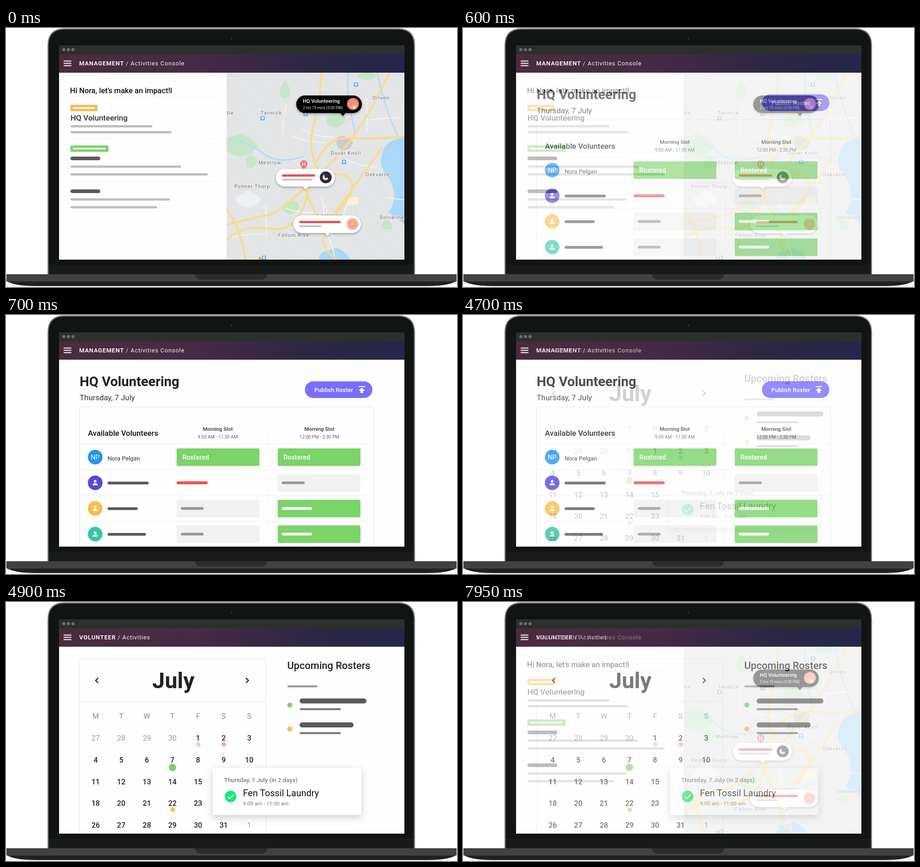
These frames come from a looping animation (986x568 px, 8 s). An HTML page:

```html
<!DOCTYPE html>
<html lang="en">
<head>
<meta charset="utf-8">
<title>Volunteer roster</title>
<style>
  html, body { margin: 0; height: 100%; overflow: hidden; background: #fff; }
  svg { display: block; width: 986px; height: 568px; font-family: Roboto, Arial, sans-serif; }
  .road { fill: none; stroke-linecap: round; stroke-linejoin: round; }
  .place { letter-spacing: 1px; paint-order: stroke; stroke: #f4f4f4; stroke-width: 2px; }
  .head { letter-spacing: .8px; }
</style>
</head>
<body>
<svg viewBox="0 0 986 568">
  <defs>
    <linearGradient id="header" gradientUnits="userSpaceOnUse" x1="116" y1="58" x2="871" y2="98">
      <stop offset="0" stop-color="#4a2c3d"/><stop offset=".4" stop-color="#452b43"/>
      <stop offset=".75" stop-color="#2b2743"/><stop offset="1" stop-color="#25264a"/>
    </linearGradient>
    <radialGradient id="sun">
      <stop offset="0" stop-color="#ffe0b0"/><stop offset=".35" stop-color="#ff9f87"/>
      <stop offset=".6" stop-color="#ff9a92"/><stop offset=".65" stop-color="#ffaaa5"/>
      <stop offset="1" stop-color="#ffb0aa"/>
    </radialGradient>
    <pattern id="streets" width="17" height="13" patternUnits="userSpaceOnUse" patternTransform="rotate(14)">
      <path d="M0 0H17M0 0V13" stroke="#f3f4f5" stroke-width="1.4"/>
    </pattern>
    <filter id="soft" x="-20%" y="-40%" width="140%" height="200%">
      <feDropShadow dx="0" dy="2" stdDeviation="2.5" flood-opacity=".35"/>
    </filter>
    <filter id="lift" x="-20%" y="-30%" width="140%" height="180%">
      <feDropShadow dx="0" dy="5" stdDeviation="8" flood-opacity=".2"/>
    </filter>
    <clipPath id="screen"><path d="M116 58H871V508H116Z"/></clipPath>
    <clipPath id="mapArea"><path d="M482.5 98H871V508H482.5Z"/></clipPath>
  </defs>
  <path d="M92 541V38Q92 2 128 2H857Q893 2 893 38V541Z" fill="#121313" stroke="#777a7b" stroke-width="2.5"/>
  <path d="M94 519H891V540H94Z" fill="#191a1a"/>
  <circle cx="493" cy="23" r="2.5" fill="#292b2b"/>
  <path d="M116 38H871V58H116Z" fill="#2d2e2e"/>
  <path d="M126.500 47.500h20.500" stroke="#6a6b6b" stroke-width="7" stroke-linecap="round" stroke-dasharray="0 10"/>
  <path d="M1 555H985Q966 566 922 566H64Q20 566 1 555Z" fill="#202121"/>
  <path d="M1 540H985V556H1Z" fill="#404141"/>
  <path d="M413 540H571Q570 552 556 552H428Q414 552 413 540Z" fill="#2b2c2c"/>
  <g id="pages" clip-path="url(#screen)"></g>
</svg>
<script>
const GREEN = '#7bd468', ORANGE = '#fbbc4b', RED = '#e95350', DARK = '#5a5a5a', GREY = '#bdbdbd';

const rect = (x, y, w, h, fill, r = 0, extra = '') =>
  `<rect x="${x}" y="${y}" width="${w}" height="${h}" rx="${r}" fill="${fill}" ${extra}/>`;
const bar = (x, y, w, h, fill) => rect(x, y - h / 2, w, h, fill, h / 2);
const dot = (x, y, r, fill) => `<circle cx="${x}" cy="${y}" r="${r}" fill="${fill}"/>`;
const path = (d, fill, extra = '') => `<path d="${d}" fill="${fill}" ${extra}/>`;
const stroke = (d, color, w) => path(d, 'none', `stroke="${color}" stroke-width="${w}"`);
const rule = (x1, x2, y) => stroke(`M${x1} ${y}H${x2}`, '#eee', 1);
const text = (x, y, size, str, fill = '#222', weight = 400, extra = '') =>
  `<text x="${x}" y="${y}" font-size="${size}" fill="${fill}" font-weight="${weight}" ${extra}>${str}</text>`;
const mid = 'text-anchor="middle"';
const repeat = (n, draw) => Array.from({ length: n }, (_, i) => draw(i)).join('');

let seed = 7;
const random = () => (seed = seed * 16807 % 2147483647) / 2147483647;

function page(title, section, body) {
  return '<g>' + rect(116, 98, 755, 410, '#fefefe') + rect(116, 58, 755, 40, 'url(#header)') +
    repeat(3, i => rect(126, 71.5 + 5 * i, 17, 2, '#fff')) +
    text(160, 82, 13, `<tspan font-weight="700">${title}</tspan> / ${section}`, '#f4f1f4', 400, 'class="head"') +
    body + '</g>';
}

function bubble(x, y, w, tail, fill) {
  return '<g filter="url(#soft)">' + rect(x, y, w, 38.5, fill, 19.25) +
    path(`M${tail - 6} ${y + 38}h12l-6 7Z`, fill) + '</g>';
}

// Irregular polygon around a centre
function blob(x, y, rx, ry, fill) {
  const points = Array.from({ length: 8 }, (_, i) => {
    const a = i * Math.PI / 4, r = .75 + .4 * random();
    return `${x + rx * r * Math.cos(a)} ${y + ry * r * Math.sin(a)}`;
  });
  return path(`M${points.join('L')}Z`, fill);
}

const roads = (d, color, w) => path(d, 'none', `class="road" stroke="${color}" stroke-width="${w}"`);

function cityMap() {
  const highways = 'M690 98Q688 150 672 215T692 322M838 98Q795 190 757 241T655 350 575 410 482 432' +
    'M871 238Q810 245 757 241T680 292M820 265Q775 330 708 420M482 466Q515 430 575 440T655 378 742 324' +
    'M742 324Q780 345 722 407T724 508M482 398Q512 435 524 508M654 350Q665 390 700 450';
  let minor = '';
  for (let i = 0; i < 14; i++) {
    const x = 490 + 370 * random(), y = 110 + 380 * random(), tilt = 40 * random() - 20;
    minor += i % 2 ? `M${x} ${y}q${tilt} 30 ${tilt} 70` : `M${x} ${y}q30 ${tilt} 70 ${tilt}`;
  }
  const place = (x, y, name) => text(x, y, 11, name, '#6c6d70', 400, 'class="place"');
  const station = (x, y) => rect(x - 4.5, y - 4.5, 9, 9, '#4ea4ec', 1.5) +
    rect(x - 2.5, y - 3, 5, 4.5, '#e8f5ff', 1) + rect(x - 2, y + 2.5, 4, 1, '#e8f5ff');
  const park = (x, y, rx, ry) => blob(x, y, rx, ry, '#c5e7c5');
  return '<g clip-path="url(#mapArea)">' + rect(482, 98, 389, 410, '#e3e4e5') +
    rect(482, 98, 389, 410, 'url(#streets)', 0, 'opacity=".3"') +
    park(610, 137, 14, 20) + park(722, 200, 24, 18) + park(790, 105, 22, 10) + park(512, 258, 36, 24) +
    park(622, 394, 20, 16) + park(832, 432, 14, 12) + park(536, 295, 14, 14) +
    blob(737, 250, 20, 18, '#cbcccf') + blob(530, 376, 28, 18, '#eef0f4') + blob(758, 380, 15, 10, '#fbf0d4') +
    path('M871 241Q838 242 826 266T826 314Q845 334 848 360T836 404L871 430Z', '#a9d8fa') +
    path('M684 508Q686 488 704 490 728 470 753 508Z', '#a9d8fa') +
    roads('M482 242Q530 250 562 275T650 282M748 98Q742 140 764 232M812 98Q824 165 858 242', '#b1dcfa', 3) +
    roads(minor, '#f6f4ec', 2) + roads(highways, '#f2d273', 3.8) + roads(highways, '#fddf8a', 2.6) +
    place(801, 157, 'Orlven') + place(557, 190, 'Tarmick') + place(473, 190, 'odle') +
    place(710, 278, 'Duvar Knoll') + place(552, 299, 'Mestrow') + place(786, 325, 'Oakvarne') +
    place(499, 351, 'Polmer Thorp') + place(681, 415, 'Lanterise') + place(817, 419, 'Solvarine') +
    place(595, 458, 'Fallom Rise') +
    station(765, 124) + station(561, 198) + station(655, 189) + station(739, 294) + station(564, 504) +
    dot(555, 505, 3.5, '#f4b344') +
    path('M643 298a8 8 0 0 1 16 0q0 5-8 12-8-7-8-12Z', '#ec7275') + text(651, 302.5, 12, 'H', '#fff', 500, mid) +
    '</g>';
}

function bubbles() {
  const summary = (x, y, redWidth, greyWidth) => bar(x, y, redWidth, 5, RED) + bar(x, y + 9.2, greyWidth, 3.2, GREY);
  return bubble(634.5, 148, 143.5, 736.5, '#000') +
    text(649, 164, 11, 'HQ Volunteering', '#fff', 500) + text(649, 178, 8.2, '2 hrs 15 mins (6:00 PM)', '#ddd') +
    dot(758.5, 166.5, 13, '#ff8878') + dot(759, 172, 6, '#ffa46f') + dot(762, 174, 3, '#ffe8cf') +
    bubble(590, 309, 129, 655, '#fff') + summary(603, 323.5, 73, 67) + dot(699, 327.5, 13, '#2c2944') +
    path('M697 321a6.500 6.500 0 1 0 7 10 7 7 0 0 1-7-10Z', '#fbe19b') + dot(702, 330, 2, '#f4eee2') +
    bubble(628, 411, 148, 703, '#fff') + summary(641, 425.5, 91, 49) + dot(757.5, 430, 13, 'url(#sun)');
}

function activities() {
  const tag = (y, w, fill) => rect(141, y, w, 14, fill) + bar(146, y + 7, w - 11, 3.5, '#fff');
  const line = (y, w) => bar(141, y, w, 5, GREY);
  const item = (y, first, second) => bar(141, y, 65, 8, DARK) + line(y + 18, first) + line(y + 35, second);
  return text(140, 142.5, 16.5, 'Hi Nora, let’s make an impact!l', '#111', 500) + rule(140, 453, 151.5) +
    tag(168.5, 59, '#f9b94c') + text(141, 202.5, 17, 'HQ Volunteering', '#333', 500) +
    line(215.5, 179) + line(228.5, 221) + rule(140, 453, 242.5) +
    tag(257.5, 83, GREEN) + item(286, 242, 300) + rule(140, 456, 336.5) + item(358, 217, 189) +
    cityMap() + bubbles();
}

function roster() {
  const slots = {
    rostered: (x, y) => rect(x, y - 19, 181, 38.5, GREEN, 3) + text(x + 12.5, y + 5.5, 14.5, 'Rostered', '#fff', 500),
    busy: (x, y) => rect(x, y - 19, 181, 38.5, GREEN, 3) + bar(x + 9, y, 66, 6, '#fff'),
    free: (x, y) => rect(x, y - 19, 181, 38.5, '#f1f1f1', 3) + bar(x + 9, y, 50, 6, '#999'),
    away: (x, y) => bar(x, y, 68, 6.5, RED),
  };
  const people = [
    ['#2196f3', 0, 'rostered', 'rostered'], ['#5549d6', 90, 'away', 'free'],
    [ORANGE, 66, 'free', 'busy'], ['#36c5a8', 84, 'free', 'busy'],
  ];
  const row = ([color, nameWidth, morning, noon], i) => {
    const y = 311.6 + 56.3 * i;
    const label = nameWidth
      ? dot(195, y - 3.2, 2.9, '#fff') + path(`M189.5 ${y + 5.5}v-1.5q0-3 5.5-3t5.5 3v1.5Z`, '#fff') +
        bar(222, y + .5, nameWidth, 6, DARK)
      : text(195, 317, 14, 'NP', '#fff', 400, mid) + text(222, 318.5, 13, 'Nora Pelgan', '#333');
    return rule(161, 803, y - 28) + dot(195, y, 16, color) + label + slots[morning](373, y) + slots[noon](594, y);
  };
  const heading = (x, hours) => text(x, 254, 11.4, 'Morning Slot', '#333', 500, mid) + text(x, 271, 10, hours, '#666', 400, mid);
  return text(161, 155.5, 29.4, 'HQ Volunteering', '#222', 700) + text(161, 187, 16.9, 'Thursday, 7 July', '#333') +
    rect(653.5, 145.5, 147.5, 36.5, '#796eff', 18.25) + text(674, 168.5, 13, 'Publish Roster', '#fff', 500) +
    path('M771 156h14v2h-14ZM778 159.500l7 6.500h-4v5h-6v-5h-4Z', '#fff') +
    rect(160.5, 201.5, 643, 330, 'none', 4, 'stroke="#e3e3e3"') +
    text(179, 265, 16.8, 'Available Volunteers', '#111', 500) +
    heading(463, '9:00 AM - 11:30 AM') + heading(685, '12:00 PM - 2:30 PM') +
    stroke('M573.5 250V508', '#f3f3f3', 1) + people.map(row).join('');
}

function calendar() {
  const column = i => 196 + 55.95 * (i % 7);
  const day = i => {
    const n = i < 22 ? i - 3 : i - 2; // the printed month skips the 19th
    const inMonth = n > 0 && n < 32;
    return text(column(i), 304 + 47.75 * Math.floor(i / 7), 16, n < 1 ? n + 30 : inMonth ? n : n - 31,
      inMonth ? '#222' : '#999', inMonth ? 500 : 400, mid);
  };
  const upcoming = (y, w, color) => dot(620.5, y + 9, 5.5, color) + bar(642, y, w, 11, DARK) + bar(642, y + 18, 90, 4.5, '#7c7c7c');
  return rect(160, 124.5, 408, 420, 'none', 4, 'stroke="#e5e5e5"') + stroke('M160 218H568', '#e5e5e5', 1) +
    text(366, 189, 49, 'July', '#222', 700, mid) +
    stroke('M201.5 166.5l-5.5 5.5 5.5 5.5M524.5 166.5l5.5 5.5-5.5 5.5', '#1a1a1a', 2.3) +
    repeat(7, i => text(column(i), 256, 16, 'MTWTFSS'[i], '#8a8a8a', 400, mid)) + repeat(35, day) +
    dot(420.5, 312.5, 5, '#bde8b3') + dot(476.5, 312.5, 5, '#f2acad') + dot(364, 363, 8, '#79d267') + dot(364.5, 455.5, 5, ORANGE) +
    rect(452, 364, 325, 103, '#fff', 2, 'filter="url(#lift)"') +
    text(477, 394.5, 13.2, 'Thursday, 7 July (in 2 days)', '#7c7c7c', 500) +
    dot(491, 426.5, 12.7, '#12ec7c') + stroke('M484.5 427l4.5 4.5 9-9.5', '#fff', 2.2) +
    text(518, 426, 20, 'Fen Tossil Laundry', '#111') + text(518, 446, 11.7, '9:00 am - 11:00 am', '#777') +
    text(615, 147, 22, 'Upcoming Rosters', '#222', 500) + bar(615, 185, 66, 4.5, '#9d9d9d') +
    upcoming(217, 146, GREEN) + upcoming(269.5, 118, ORANGE);
}

const holder = document.getElementById('pages');
holder.innerHTML = page('MANAGEMENT', 'Activities Console', activities()) +
  page('MANAGEMENT', 'Activities Console', roster()) + page('VOLUNTEER', 'Activities', calendar());
const pages = [...holder.children];
const LOOP = 8000, STEP = 50, FADE_STEPS = 5, starts = [500, 4700, 7900];

// Each page dissolves over the previous one in five equal steps
let shown = '';
function draw(now) {
  const t = now % LOOP;
  const passed = starts.filter(s => t >= s).length;
  const next = passed % 3, base = (passed + 2) % 3;
  const mix = passed ? Math.min(1, (Math.floor((t - starts[passed - 1]) / STEP) + 1) / FADE_STEPS) : 1;
  const state = `${next} ${mix}`;
  if (state !== shown) {
    shown = state;
    pages.forEach((p, i) => {
      p.style.display = i === next || (i === base && mix < 1) ? '' : 'none';
      p.style.opacity = i === next ? mix : 1;
    });
    holder.append(pages[next]);
  }
  requestAnimationFrame(() => draw(performance.now()));
}
draw(0);
</script>
</body>
</html>
```
